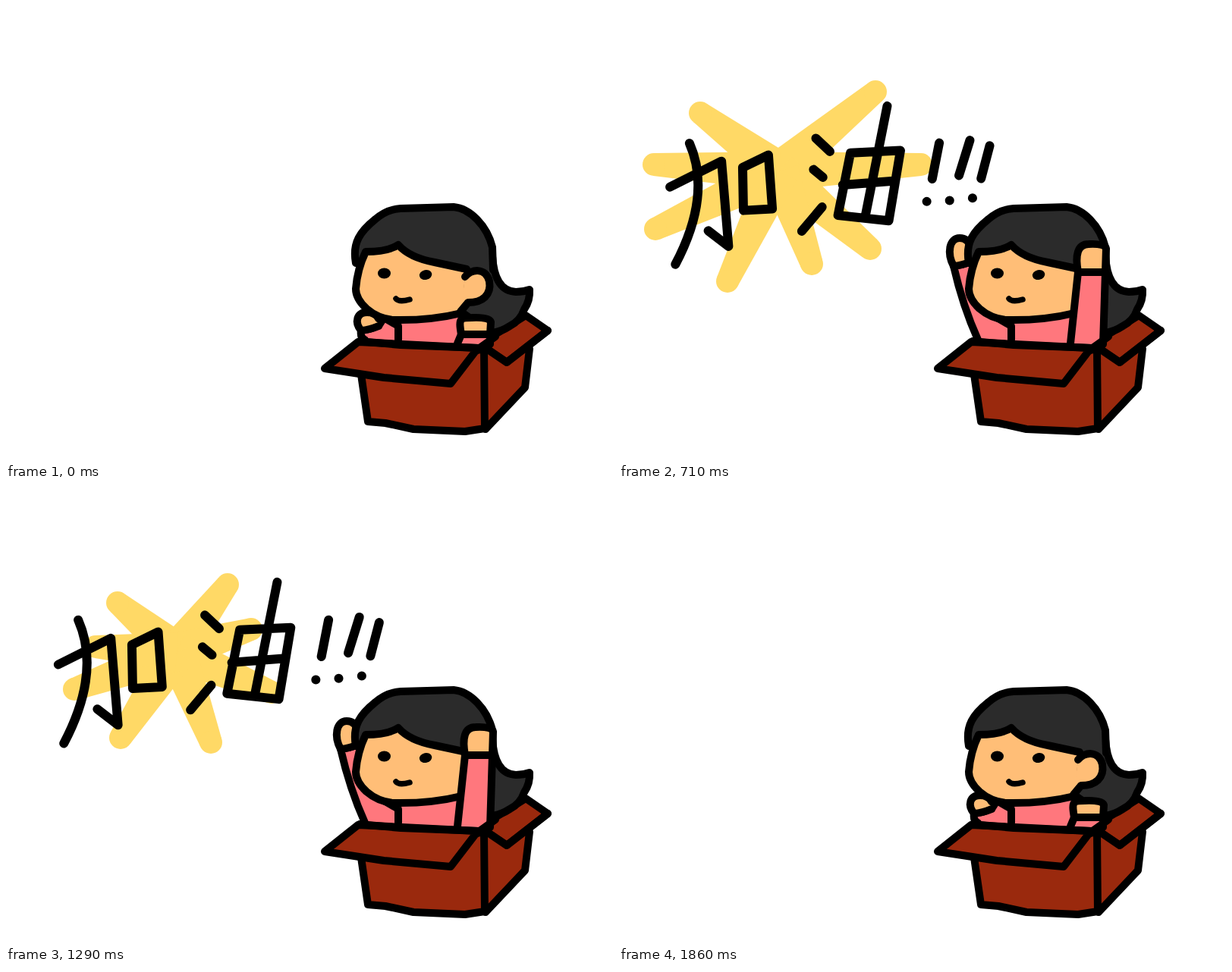
These frames come from a looping animation (800 px wide and 600 px high, 2280 ms). An HTML page:

```html
<!DOCTYPE html>
<html lang="zh">
<head>
<meta charset="utf-8">
<title>加油</title>
<style>
  html, body { margin: 0; width: 100%; height: 100%; overflow: hidden; background: #fff; }
  svg { display: block; width: 800px; height: 600px; }
  .ink { stroke: #000; stroke-width: 10; stroke-linecap: round; stroke-linejoin: round; }
  .line { fill: none; }
  .skin { fill: #ffbe77; }
  .pink { fill: #ff777d; }
  .hair { fill: #2b2b2b; }
  .card { fill: #9a290d; }
  #words { stroke-width: 12; }
  #words path { vector-effect: non-scaling-stroke; }
</style>
</head>
<body>
<svg viewBox="0 0 800 600" role="img" aria-label="加油!!!">
  <g id="burst" fill="#ffd966"></g>
  <g id="words" class="ink line"></g>

  <!-- far side of the box, back hair, body -->
  <path class="ink card" d="M632 451 L660 470 L714 428 L685 408 L640 436 Z"/>
  <path class="ink hair" d="M600 330 L641 330 Q644 376 672 377 Q682 377 690 374 Q691 388 683 400 Q678 415 664 422 Q652 430 640 431 L598 402 Z"/>
  <path class="pink" d="M470 432 L515 408 L600 404 L640 432 L640 446 L480 444 Z"/>
  <path id="sleeveL" class="ink pink"/>
  <path id="handL" class="ink skin"/>

  <!-- head -->
  <path class="hair" d="M461 339 C456 312 467 297 487 281 Q502 268 520 267 L590 265 C612 267 634 290 641 318 L642 348 L605 350 L517 322 L474 326 Z"/>
  <path class="skin" d="M474 324 Q503 324 517 315 Q532 332 565 338 L605 347 L602 404 Q560 415 510 414 Q490 412 475 399 Q461 386 461 373 Q463 347 474 324 Z"/>
  <path class="ink line" d="M461 339 C456 312 467 297 487 281 Q502 268 520 267 L590 265 C612 267 634 290 641 318 L642 348"/>
  <path class="ink line" d="M607 347 L565 338 Q532 332 517 315 Q503 324 474 324 Q463 347 461 373 Q461 386 475 399 Q490 412 510 414 Q560 415 600 405"/>
  <path id="ear" class="ink skin" d="M605 357 C613 347 632 344 637 363 C640 381 628 391 609 391 L599 403"/>
  <ellipse cx="498.500" cy="352.500" rx="8.500" ry="7"/>
  <ellipse cx="553" cy="354.500" rx="8.300" ry="6.500" transform="rotate(-12 553 354)"/>
  <path class="ink line" style="stroke-width:7.500" d="M514 386 Q518 391 532 387"/>

  <path id="sleeveR" class="ink pink"/>
  <path id="handR" class="ink skin"/>

  <!-- near side of the box -->
  <path class="card" d="M631 453 L660 470 L690 450 L684 503 L632 558 Z"/>
  <path class="ink line" d="M690 452 L684 503 L632 558 M632 451 L660 470 L714 428"/>
  <path class="ink card" d="M468 486 L477 548 L500 550 L537 558 L605 561 L631 557 L630 452 Z"/>
  <path class="ink card" d="M464 443 L622 451 L586 498 L498 490 L420 478 Z"/>
  <path class="ink line" d="M466 442 L520 447 L624 451 L645 436"/>
</svg>
<script>
const $ = id => document.getElementById(id);
const LOOP = 2280;

// Each part of the lettering grows out of its own pivot.
const parts = [
  { x: 129, y: 250, d: "M67 240 L133 207 L142 316 L116 296 M92 184 Q121 250 74 339" },
  { x: 163, y: 249, d: "M161 215 L194 199 L199 268 L162 270 Z" },
  { x: 277, y: 230, d: "M258 177 L276 194 M255 217 L267 227 M266 265 L240 296" },
  { x: 301, y: 240, d: "M303 196 L367 193 L352 283 L287 276 Z M293 237 L358 232 M350 136 L322 277" },
  { x: 418, y: 229, d: "M420 183 L411 229 M404 258 h.1" },
  { x: 445, y: 242, d: "M460 180 L446 225 M434 257 h.1" },
  { x: 468, y: 245, d: "M486 187 L475 229 M464 254 h.1" }
];

// Ray tips of the two bursts, seen from CENTRE.
const CENTRE = [225, 215];
const flare = [[-104, -77], [127, -105], [187, -9], [120, 102], [43, 122], [-68, 145], [-163, 76], [-165, -9]];
const glow = [[-78, -65], [67, -89], [98, -30], [125, 53], [45, 119], [-74, 113], [-135, 49], [-107, -7]];

// raise: how far the arms are up; size, dx, dy: lettering; rays, rx, ry: burst
const steps = [
  { at: 0, raise: 0 },
  { at: 140, raise: 0.3, size: 0.1 },
  { at: 290, raise: 0.6, size: 0.33 },
  { at: 430, raise: 0.8, size: 0.73 },
  { at: 570, raise: 1, size: 1 },
  { at: 710, raise: 1, size: 1.03, dx: 2, dy: -1, rays: flare, rx: -14, ry: 3 },
  { at: 860, raise: 1, size: 1.05, dx: 5, dy: -2, rays: flare },
  { at: 1000, raise: 1, size: 1.05, dx: 5, dy: -4, rays: flare, rx: -6, ry: -14 },
  { at: 1140, raise: 1, size: 1.05, dx: 5, dy: -6, rays: flare, rx: -9, ry: -16 },
  { at: 1290, raise: 1, size: 1.05, dx: 5, dy: -8, rays: glow },
  { at: 1430, raise: 0.8, size: 0.7, dy: -2 },
  { at: 1570, raise: 0.6, size: 0.33, dy: -4 },
  { at: 1710, raise: 0.3, size: 0.1, dy: -4 },
  { at: 1860, raise: 0 }
];

function lettering({ size, dx = 0, dy = 0 }) {
  return parts.map(({ x, y, d }) =>
    `<path d="${d}" transform="translate(${x + dx} ${y + dy}) scale(${size}) translate(${-x} ${-y})"/>`
  ).join("");
}

// A ray tapers from the half-width at its root to a round tip.
function ray([x, y]) {
  const root = 26, tip = 15, len = Math.hypot(x, y);
  const nx = -y / len, ny = x / len;
  const side = (px, py, w) => `${px + nx * w} ${py + ny * w}`;
  const corners = [side(0, 0, -root), side(x, y, -tip), side(x, y, tip), side(0, 0, root)];
  return `<path d="M${corners.join("L")}Z"/><circle cx="${x}" cy="${y}" r="${tip}"/>`;
}

function burst({ rays, rx = 0, ry = 0 }) {
  const [x, y] = CENTRE;
  return `<g transform="translate(${x + rx} ${y + ry})"><circle r="30"/>${rays.map(ray).join("")}</g>`;
}

function leftArm(raise) {
  const x = 468 - 27 * raise, y = 428 - 85 * raise, h = 24 + 13 * raise;
  const cuff = `${x + 23} ${y - 6} Q${x + 11} ${y - 1} ${x} ${y}`;
  $("handL").setAttribute("d",
    `M${cuff} C${x - 9} ${y - h * 0.45} ${x - 6} ${y - h} ${x + 8} ${y - h} Q${x + 19} ${y - h} ${x + 23} ${y - h * 0.65}`);
  $("sleeveL").setAttribute("d",
    `M517 440 L517 422 L498 411 L${cuff} Q${(x + 473) / 2 - 4} ${(y + 440) / 2 + 4} 473 440`);
}

function rightArm(raise) {
  const l = 600 + 5 * raise, r = 638 + 3 * raise;
  const y = 433 - 82 * raise, top = y - 22 - 15 * raise;
  $("handR").setAttribute("d",
    `M${l} ${y} C${l - 4} ${y - 22} ${l - 1} ${top} ${l + 14} ${top} Q${r} ${top - 1} ${r + 1} ${top + 6} L${r} ${y} Z`);
  $("sleeveR").setAttribute("d", `M595 445 L${l} ${y} L${r} ${y} L638 446`);
}

function show(step) {
  leftArm(step.raise);
  rightArm(step.raise);
  $("ear").style.display = step.raise < 0.5 ? "" : "none";
  $("words").innerHTML = step.size ? lettering(step) : "";
  $("burst").innerHTML = step.rays ? burst(step) : "";
}

let current;
function tick() {
  const t = performance.now() % LOOP;
  const step = steps.findLast(s => s.at <= t);
  if (step !== current) show(current = step);
  requestAnimationFrame(tick);
}
tick();
</script>
</body>
</html>
```
